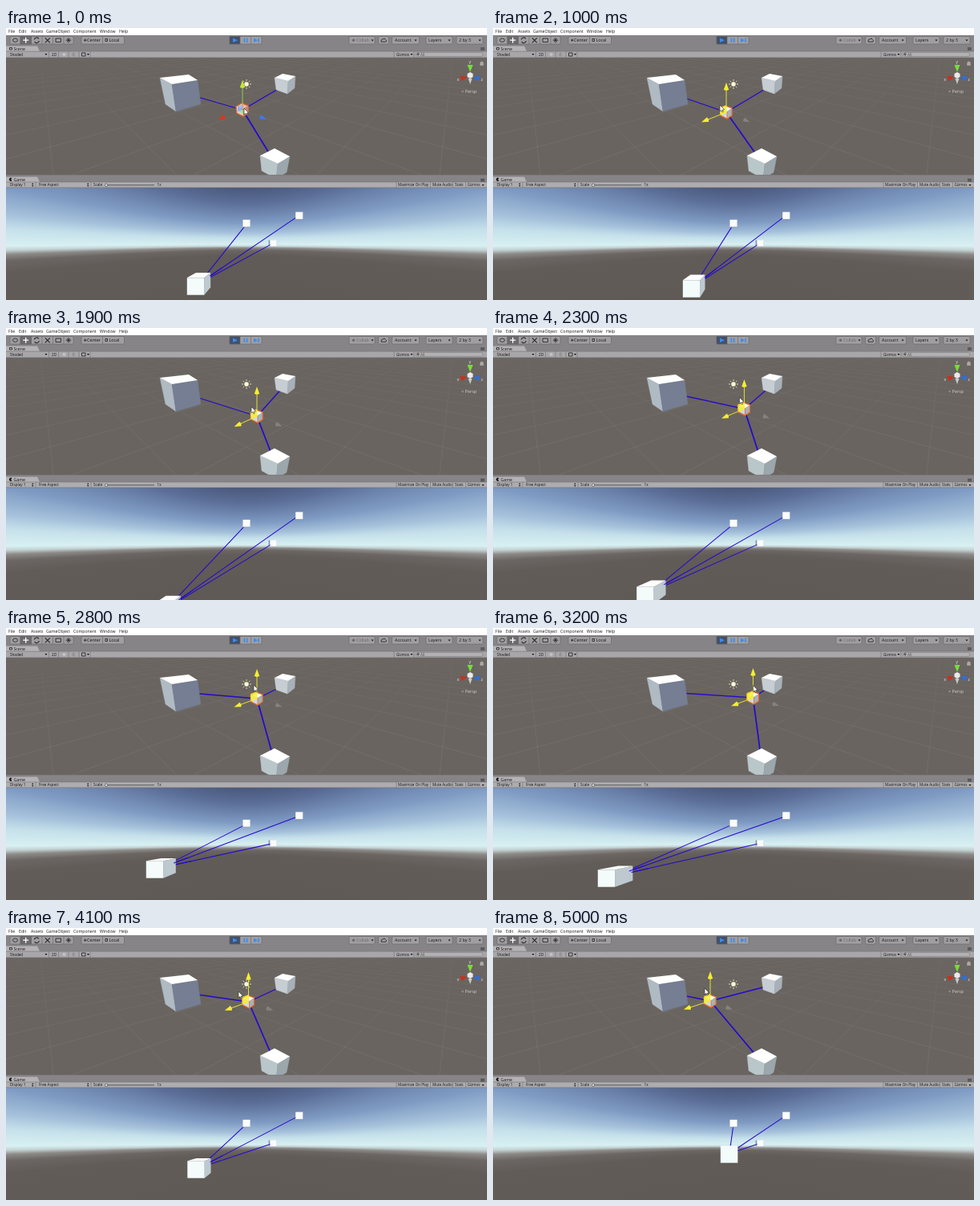
Write an HTML page with a canvas that moves like this. It is 600x339 px and loops after 5.1 s.

```html
<!DOCTYPE html>
<html lang="en">
<head>
<meta charset="utf-8">
<title>Cube links</title>
<style>
html, body { margin: 0; width: 100%; height: 100%; overflow: hidden; background: #868486; }
canvas, svg { position: absolute; left: 0; top: 0; width: 600px; height: 339px; }
svg { font: 5px "Open Sans", sans-serif; fill: #151515; }
.menu { font-size: 5.2px; }
.bar { font-size: 5.4px; }
.tab { font-size: 5.2px; }
.row { font-size: 4.6px; }
.btn rect { fill: #a09ea0; stroke: #666; stroke-width: .6; }
.btn path { stroke: #666; stroke-width: .6; }
.btn .on { fill: #6c6a6c; }
.ico { fill: none; stroke: #2c2c2c; stroke-width: .9; }
.rule { stroke: #757375; stroke-width: .6; }
</style>
</head>
<body>
<canvas id="back" width="600" height="339"></canvas>
<canvas id="front" width="600" height="339"></canvas>
<svg viewBox="0 0 600 339">
  <rect width="600" height="9" fill="#fff"/>
  <g class="menu">
    <text x="3" y="6.3">File</text><text x="16" y="6.3">Edit</text><text x="31" y="6.3">Assets</text>
    <text x="50" y="6.3">GameObject</text><text x="84" y="6.3">Component</text>
    <text x="117" y="6.3">Window</text><text x="141" y="6.3">Help</text>
  </g>
  <rect y="9" width="600" height="20" fill="#868486"/>
  <g class="btn">
    <rect x="5" y="10.5" width="79" height="9.5" rx="1.5"/>
    <rect class="on" x="18" y="10.5" width="13.5" height="9.5"/>
    <path d="M18 10.5v9.5M31.5 10.5v9.5M45 10.5v9.5M58.5 10.5v9.5M72 10.5v9.5"/>
    <rect x="94" y="10.5" width="53.5" height="9.5" rx="1.5"/>
    <path d="M120.5 10.5v9.5"/>
    <rect x="279" y="10.5" width="40" height="9.5" rx="1.5"/>
    <rect x="279" y="10.5" width="13" height="9.5" style="fill:#42506a"/>
    <path d="M305.5 10.5v9.5"/>
    <rect x="428" y="10.5" width="32" height="9.5" rx="1.5"/>
    <rect x="464.5" y="10.5" width="13" height="9.5" rx="1.5"/>
    <rect x="481.5" y="10.5" width="34" height="9.5" rx="1.5"/>
    <rect x="524" y="10.5" width="33" height="9.5" rx="1.5"/>
    <rect x="562" y="10.5" width="33" height="9.5" rx="1.5"/>
  </g>
  <g class="ico">
    <ellipse cx="11.5" cy="15.2" rx="3" ry="2.2"/>
    <path d="M24.7 11.7v7M21.2 15.2h7" stroke="#fff" stroke-width="1.3"/>
    <path d="M35.3 14.5a3 3 0 0 1 5.6-1M41.3 16a3 3 0 0 1-5.6 1" stroke-width="1.2"/>
    <path d="M48.8 12.3l6 6M54.8 12.3l-6 6" stroke-width="1.2"/>
    <path d="M62 13h6.5v4.5H62z"/>
    <path d="M78 12v6.5M74.8 15.2h6.5M76 13.2l4 4M80 13.2l-4 4"/>
    <path d="M97 15.2h3.5M98.7 13.5v3.5M124 13.5h2.5v3H124z"/>
    <path d="M468 17.2h6q1.5-1.5-.5-2.5q-1-3-3.5-.8q-2.500 0-2 3.300z"/>
  </g>
  <g fill="#3b8cf0">
    <path d="M283 12.5l6 2.8-6 2.8z"/>
    <path d="M296.5 12.5h1.7v5.6h-1.7zM299.8 12.5h1.7v5.6h-1.7z"/>
    <path d="M309 12.5l5 2.8-5 2.8zM314.3 12.5h1.5v5.6h-1.5z"/>
  </g>
  <g class="bar">
    <text x="101" y="17.2">Center</text><text x="128.5" y="17.2">Local</text>
    <g fill="#6a686a"><text x="437" y="17.2">Collab</text><circle cx="433.5" cy="15.2" r="1.7"/></g>
    <text x="485" y="17.2">Account</text><text x="527" y="17.2">Layers</text><text x="565" y="17.2">2 by 3</text>
    <path d="M455.5 14.5h3l-1.5 2zM509.5 14.5h3l-1.5 2zM551.5 14.5h3l-1.5 2zM589.5 14.5h3l-1.5 2z"/>
  </g>

  <path d="M0 29V22.5H39l3 6.5z" fill="#b4b2b4"/>
  <rect y="29" width="600" height="8" fill="#a8a6a8"/>
  <path class="rule" d="M0 29.2H600M0 36.8H600M53.5 29v8M65.5 29v8M78 29v8M91 29v8M105 29v8M484 29v8M509 29v8"/>
  <rect x="511" y="30.5" width="84" height="5" rx="2.5" fill="#b2b0b2" stroke="#777" stroke-width=".5"/>
  <text class="tab" x="9.5" y="27.5">Scene</text>
  <g class="row">
    <text x="5" y="34.7">Shaded</text><text x="57" y="34.7">2D</text><text x="487" y="34.7">Gizmos</text>
    <text x="517" y="34.5" fill="#555">All</text>
    <path d="M48.5 32h3l-1.5 2zM101 32h3l-1.5 2zM504.5 32h3l-1.5 2z"/>
  </g>

  <rect y="183" width="600" height="9" fill="#868486"/>
  <path d="M0 192V185.5H39l3 6.5z" fill="#b4b2b4"/>
  <rect y="192" width="600" height="7" fill="#aeacae"/>
  <path class="rule" d="M0 183.3H600M0 192H600M0 198.8H600M37 192v7M106 192v7M487 192v7M529.5 192v7M557.5 192v7M573.5 192v7"/>
  <text class="tab" x="9.5" y="190.5">Game</text>
  <path d="M6 188.7l1.500-1.500a2.100 2.100 0 1 0 0 3z"/>
  <g class="row">
    <text x="5" y="197.3">Display 1</text><text x="41" y="197.3">Free Aspect</text>
    <text x="109" y="197.3">Scale</text><text x="188.5" y="197.3">1x</text>
    <text x="489" y="197.3">Maximize On Play</text><text x="532" y="197.3">Mute Audio</text>
    <text x="560" y="197.3">Stats</text><text x="575.5" y="197.3">Gizmos</text>
    <path d="M32 195h2.5l-1.2-1.7zM32 196h2.5l-1.2 1.7zM101 195h2.5l-1.2-1.7zM101 196h2.5l-1.2 1.7zM593.5 195h3l-1.5 2z"/>
  </g>
  <path d="M125 195.8H185" stroke="#444" stroke-width=".8"/>
  <circle cx="125" cy="195.8" r="1.7" fill="#ddd" stroke="#444" stroke-width=".6"/>
  <g class="ico">
    <path d="M4.5 24.5h3v2.5h-3z"/>
    <circle cx="72.5" cy="33" r="1.3" stroke="#ddd"/><path d="M83 32v2l2 1.2v-4.4z" stroke="#888"/>
    <path d="M94.5 31h4.5v4h-4.5z"/>
    <circle cx="514" cy="32.7" r="1.1"/><path d="M592 25h5M592 27h5M592 188.5h5M592 190.5h5"/>
  </g>

  <g>
    <path d="M576.5 63h5l-2.5 7z" fill="#c9c9c9"/>
    <path d="M566.5 59.5l2 6.500 7-5z" fill="#c8301c"/>
    <path d="M591.5 59.5l-2 6.500-7-5z" fill="#2f6fd8"/>
    <path d="M575.5 46h7l-3.5 9z" fill="#78dc3c"/>
    <path d="M575.5 57l3.5-2 3.5 2v4l-3.5 2-3.5-2z" fill="#e9e9e9"/>
    <g fill="#eee"><text x="577.5" y="44">y</text><text x="562.5" y="66">x</text><text x="592.5" y="66">z</text></g>
    <text x="568" y="81" fill="#d0d0d0" font-size="5.5">&lt; Persp</text>
    <path d="M591.5 43.5h4v3h-4zM592.3 43.5v-1.5h2.4v1.5" fill="#aaa" stroke="#aaa" stroke-width=".5"/>
  </g>
</svg>
<script>
const back = document.getElementById('back').getContext('2d');
const g = document.getElementById('front').getContext('2d');
const LOOP = 5100, STEP = 100;
const BLUE = '#2408d2', YELLOW = '#f4ee30';

// time, scene x y, game x y, pointer x y
const keys = [
  [0, 295, 102, 236.5, 322, 297, 100],
  [1000, 291, 105, 247.5, 325, 283, 96],
  [1900, 313, 110, 192.5, 356, 306, 98],
  [2800, 313, 88, 185.5, 301, 309, 71],
  [3600, 332, 89, 114.5, 326.5, 334, 76],
  [4100, 302.5, 92, 237, 301, 290, 79],
  [4850, 271, 91, 294.5, 282, 264, 75],
  [5100, 271, 91, 294.5, 282, 264, 75]
];

function slope(i, c) {
  const a = keys[i - 1], b = keys[i + 1];
  return a && b && i < keys.length - 2 ? (b[c] - a[c]) / (b[0] - a[0]) : 0;
}

function pose(t) {
  let i = 0;
  while (t >= keys[i + 1][0]) i++;
  const a = keys[i], b = keys[i + 1], h = b[0] - a[0], s = (t - a[0]) / h, r = 1 - s;
  return a.slice(1).map((p, k) => r * r * (1 + 2 * s) * p + s * s * (3 - 2 * s) * b[k + 1]
    + h * s * r * (r * slope(i, k + 1) - s * slope(i + 1, k + 1)));
}

function poly(pts, fill, stroke, width = 1) {
  g.beginPath();
  pts.forEach(p => g.lineTo(p[0], p[1]));
  g.closePath();
  if (fill) { g.fillStyle = fill; g.fill(); }
  if (stroke) { g.strokeStyle = stroke; g.lineWidth = width; g.stroke(); }
}

function line(a, b, color, width) {
  g.beginPath();
  g.moveTo(a[0], a[1]);
  g.lineTo(b[0], b[1]);
  g.strokeStyle = color;
  g.lineWidth = width;
  g.stroke();
}

function inView(ctx, y, h, draw) {
  ctx.save();
  ctx.beginPath();
  ctx.rect(0, y, 600, h);
  ctx.clip();
  draw();
  ctx.restore();
}

// corners: left, back, right, front, then lower left, front, right
function block([l, b, r, f, ll, lf, lr], left, right) {
  poly([l, f, lf, ll], left, left, .4);
  poly([f, r, lr, lf], right, right, .4);
  poly([l, b, r, f], '#fff');
}

function cone(x, y, dx, dy, color, size = 1) {
  const n = Math.hypot(dx, dy), ux = dx / n * size, uy = dy / n * size;
  poly([[x + ux * 5, y + uy * 5], [x - ux * 4 - uy * 3.2, y - uy * 4 + ux * 3.2],
    [x - ux * 5, y - uy * 5], [x - ux * 4 + uy * 3.2, y - uy * 4 - ux * 3.2]], color);
}

function drawGround() {
  back.fillStyle = '#69645f';
  back.fillRect(0, 37, 600, 146);
  const fade = back.createLinearGradient(0, 37, 0, 150);
  fade.addColorStop(0, 'rgba(150,146,142,.08)');
  fade.addColorStop(1, 'rgba(150,146,142,.28)');
  back.strokeStyle = fade;
  back.lineWidth = .7;
  const k = .16;
  const ground = (u, v) => {
    const w = 1 + k * (u + v);
    return [(300 + k * (560 * u + 40 * v)) / w, (104 + 10 * k * (u + v)) / w];
  };
  for (let n = -14; n <= 24; n++) for (const flip of [0, 1]) {
    const near = -1 / k - n + 1.2, at = v => flip ? ground(v, n) : ground(n, v);
    back.beginPath();
    back.moveTo(...at(near));
    back.lineTo(...at(near + 120));
    back.stroke();
  }
}

const FOCAL = 121, NEAR = 5.65, HORIZON = 269;

// every column is the same gradient, stretched away from the horizon
function drawSky() {
  const sky = [[-70, '#4a587c'], [-50, '#5c6f98'], [-36, '#7088b1'], [-26, '#7f9bc3'], [-14, '#a4c0da'],
    [-7, '#c5e0ea'], [1, '#d8f0f2'], [3, '#c3d2d3'], [5, '#8c8a87'], [8, '#6b6663'], [14, '#615c57'], [70, '#5e5954']];
  for (let x = 0; x < 600; x += 2) {
    const h = 70 * Math.hypot(1, (x - 299) / FOCAL);
    const fill = back.createLinearGradient(0, HORIZON - h, 0, HORIZON + h);
    sky.forEach(([o, c]) => fill.addColorStop((o + 70) / 140, c));
    back.fillStyle = fill;
    back.fillRect(x, 199, 2, 140);
  }
}

function sun(x, y) {
  for (let i = 0; i < 8; i++) {
    const c = Math.cos(i * Math.PI / 4), s = Math.sin(i * Math.PI / 4);
    line([x + c * 4, y + s * 4], [x + c * 6, y + s * 6], '#e6e0bc', .9);
  }
  g.beginPath();
  g.arc(x, y, 3.2, 0, 7);
  g.fillStyle = '#fbf8dc';
  g.fill();
  g.strokeStyle = '#4d493c';
  g.lineWidth = .6;
  g.stroke();
}

function handles(x, y, planar) {
  const down = 10 + (y - 100) * .1;
  const ax = -26.5 + (x - 291) * .11, az = 25.5 + (x - 291) * .09;
  line([x, y], [x, y - 29], planar ? YELLOW : '#8fdc46', .9);
  if (planar) {
    line([x, y], [x + ax, y + down], YELLOW, .9);
    poly([[x, y], [x - 8, y + 3], [x - 8, y - 6], [x, y - 9]], 'rgba(246,240,40,.8)');
  } else {
    poly([[x, y], [x - 6, y + 2], [x - 6, y - 5], [x, y - 7]], 'rgba(80,120,240,.5)');
    poly([[x, y], [x + 6, y + 2], [x + 6, y - 5], [x, y - 7]], 'rgba(220,70,40,.4)');
    poly([[x, y], [x - 6, y + 2], [x, y + 4], [x + 6, y + 2]], 'rgba(130,220,70,.5)');
  }
  cone(x, y - 32, 0, -1, planar ? YELLOW : '#c3e92c');
  cone(x + ax, y + down, ax, down, planar ? YELLOW : '#d8381c', .95);
  cone(x + az, y + down, az, down, planar ? '#85817c' : '#3a7cf0', .9);
}

function pointer(x, y) {
  const shape = [[0, 0], [0, 8], [1.9, 6.4], [3.1, 9], [4.3, 8.4], [3.2, 6], [5.6, 5.8]];
  poly(shape.map(p => [x + p[0], y + p[1]]), '#fff', '#222', .6);
}

function drawScene(x, y, mx, my, planar) {
  [[218, 80], [348, 71], [335, 167]].forEach((p, i) => line([x, y], p, BLUE, i == 2 ? 1.7 : 1.3));
  block([[192, 62], [228, 58], [239, 65], [207, 70], [199, 95], [212, 104], [243, 95]], '#b0bac3', '#757e92');
  block([[335, 62], [345, 57], [361, 60], [352, 66], [337, 77], [351, 82], [360, 75]], '#c6cdd3', '#a8b0b8');
  block([[317, 159], [335, 150], [354, 160], [339, 169], [319, 178], [337, 188], [350, 180]], '#bac7ca', '#9ba7ac');
  sun(300, 70);
  const c = [[-8, -4], [-1, -8], [7, -5], [1, -1], [-7, 4], [1, 8], [7, 4]].map(p => [x + p[0], y + p[1]]);
  block(c, '#d2dadd', '#a7b2ba');
  poly([c[0], c[1], c[2], c[6], c[5], c[4]], null, '#f0691c', 1.2);
  line(c[3], c[5], '#f0691c', .7);
  handles(x, y, planar);
  pointer(mx, my);
}

const project = ([x, y, z]) => [300 + x * FOCAL / z, HORIZON - y * FOCAL / z];
const far = [[0, 2.83, 13.9], [7.28, 3.89, 13.9], [4.2, .05, 15.6]];

function drawGame(gx, gy) {
  const s = FOCAL / NEAR, X = (gx - 300) / s, Y = (HORIZON - gy) / s, mid = [X, Y, NEAR + .5];
  const at = (i, j, k) => project([X + i / 2, Y + j / 2, NEAR + k]);
  far.forEach(p => line(project(mid), project(p), BLUE, 1.05));
  far.forEach(([x, y, z]) => {
    const [px, py] = project([x, y, z - .5]), r = FOCAL / (z - .5) / 2;
    g.fillStyle = '#9a9eaa';
    g.fillRect(px - r, py - r + .5, 2 * r, 2 * r);
    g.fillStyle = '#fafcfc';
    g.fillRect(px - r, py - r, 2 * r, 2 * r - .3);
  });
  line([328.2, 264.5], [328.2, 271.5], '#46508c', .8);
  poly([at(1, 1, 0), at(1, 1, 1), at(1, -1, 1), at(1, -1, 0)], '#bdc9cf');
  poly([at(-1, 1, 0), at(-1, 1, 1), at(1, 1, 1), at(1, 1, 0)], '#fff');
  poly([at(-1, -1, 0), at(-1, 1, 0), at(1, 1, 0), at(1, -1, 0)], '#f3fbfb');
  // links that leave through the visible side or top lie over the cube
  far.forEach(p => {
    const d = p.map((v, i) => v - mid[i]), m = Math.max(...d);
    const along = u => project(mid.map((v, i) => v + d[i] * u / m));
    if (m > d[2]) line(along(.5), along(1.2), BLUE, 1.05);
  });
}

function frame(now) {
  const t = Math.floor(now % LOOP / STEP) * STEP;
  const [sx, sy, gx, gy, mx, my] = pose(t);
  g.clearRect(0, 0, 600, 339);
  inView(g, 37, 146, () => drawScene(sx, sy, mx, my, t >= 400));
  inView(g, 199, 140, () => drawGame(gx, gy));
  requestAnimationFrame(frame);
}

inView(back, 37, 146, drawGround);
drawSky();
requestAnimationFrame(frame);
</script>
</body>
</html>
```
